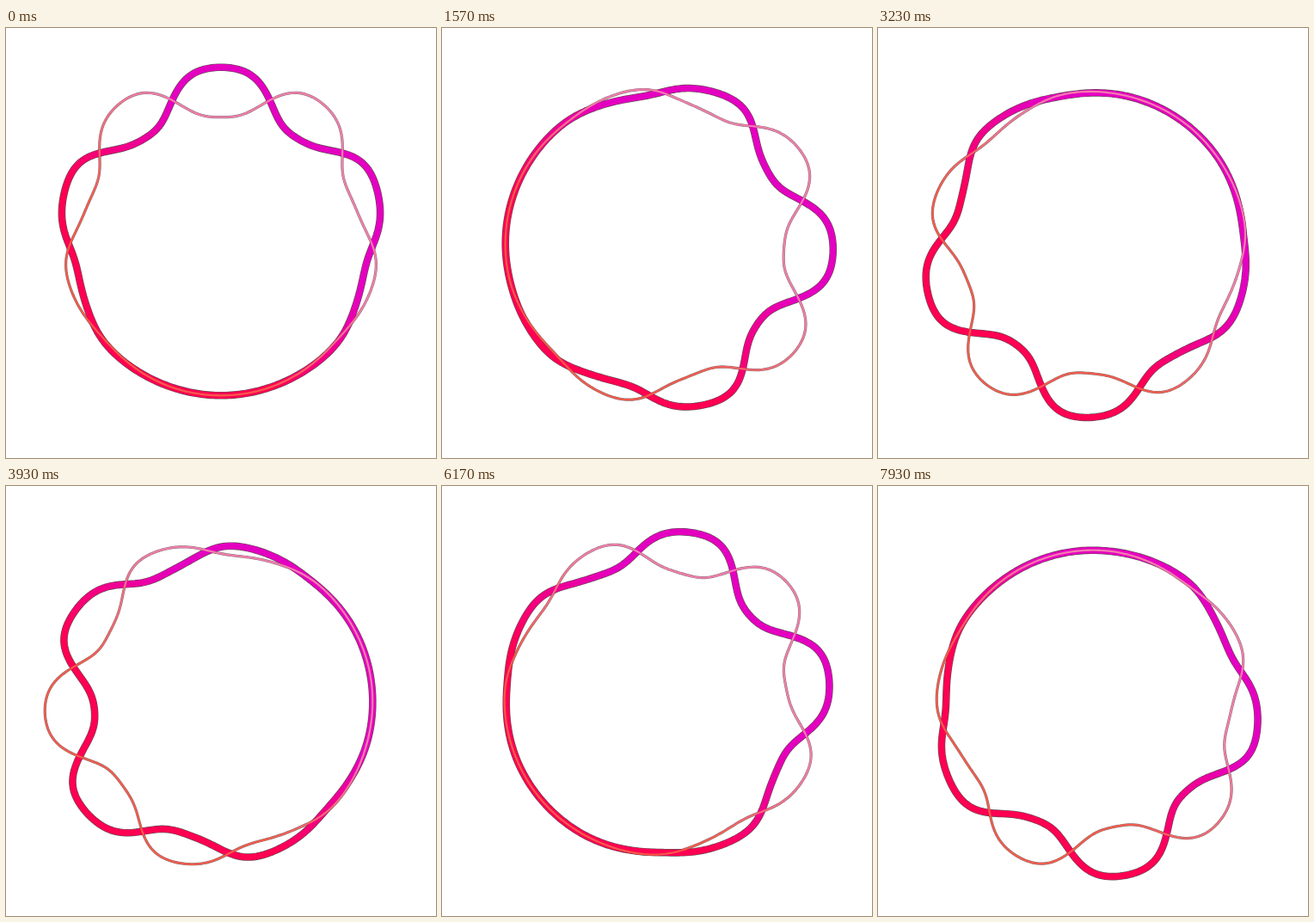
These frames come from a looping animation (500x500 px, 8000 ms). An HTML page with a canvas:

```html
<!DOCTYPE html>
<html lang="en">
<head>
<meta charset="utf-8">
<title>Twisting rings</title>
<style>
  html, body { margin: 0; width: 100%; height: 100%; overflow: hidden; background: #fff; }
  canvas { display: block; width: 100vmin; height: 100vmin; }
</style>
</head>
<body>
<canvas id="stage" width="500" height="500"></canvas>
<script>
const ctx = document.getElementById('stage').getContext('2d');
const LOOP = 8000, BLOCK = 4200, HOLD = 100, STEP = 69.45, LEAD = 10;
const CX = 250, CY = 251, RADIUS = 176.3, AMPLITUDE = 29;
const RAD = Math.PI / 180;

// Diagonal blend, bottom left to top right
function diagonal(from, to) {
  const g = ctx.createLinearGradient(195, 305, 300, 200);
  g.addColorStop(0, from);
  g.addColorStop(1, to);
  return g;
}

const thickPaint = diagonal('#ff0052', '#e400c0');
const thinPaint = diagonal('#f75c4a', '#f580ae');

// The picture advances in discrete steps, each block opening with a longer hold
function steppedTime(t) {
  const start = Math.floor(t / BLOCK) * BLOCK;
  const rest = t - start - HOLD;
  return rest < 0 ? start : start + HOLD + Math.floor((rest + LEAD) / STEP) * STEP;
}

// Cosine with rounder lobes, the crests a little wider than the troughs
function lobes(x) {
  return Math.cos(x - 0.09 * Math.sin(x) - 0.17 * Math.sin(2 * x));
}

function ring(sign, time) {
  const crest = 270 - 0.03315 * time;
  const focus = 270 + 0.0663 * time;
  const path = new Path2D();
  for (let a = 0; a < 360; a++) {
    const envelope = Math.abs(Math.cos((a - focus) / 2 * RAD)) ** 3;
    const r = RADIUS + sign * AMPLITUDE * envelope * lobes(5 * (a - crest) * RAD);
    path.lineTo(CX + r * Math.cos(a * RAD), CY + r * Math.sin(a * RAD));
  }
  path.closePath();
  return path;
}

function stroke(path, width, paint, alpha = 1) {
  ctx.globalAlpha = alpha;
  ctx.lineWidth = width;
  ctx.strokeStyle = paint;
  ctx.stroke(path);
}

function draw(now) {
  const time = steppedTime(now % LOOP);
  const thick = ring(1, time), thin = ring(-1, time);
  ctx.clearRect(0, 0, 500, 500);
  stroke(thin, 3.2, '#301018', 0.6);
  stroke(thick, 8.6, '#301018', 0.75);
  stroke(thick, 7.3, thickPaint);
  stroke(thin, 2.3, thinPaint, 0.95);
}

ctx.lineJoin = 'round';
const origin = performance.now();
function tick() {
  draw(performance.now() - origin);
  requestAnimationFrame(tick);
}
tick();
</script>
</body>
</html>
```
